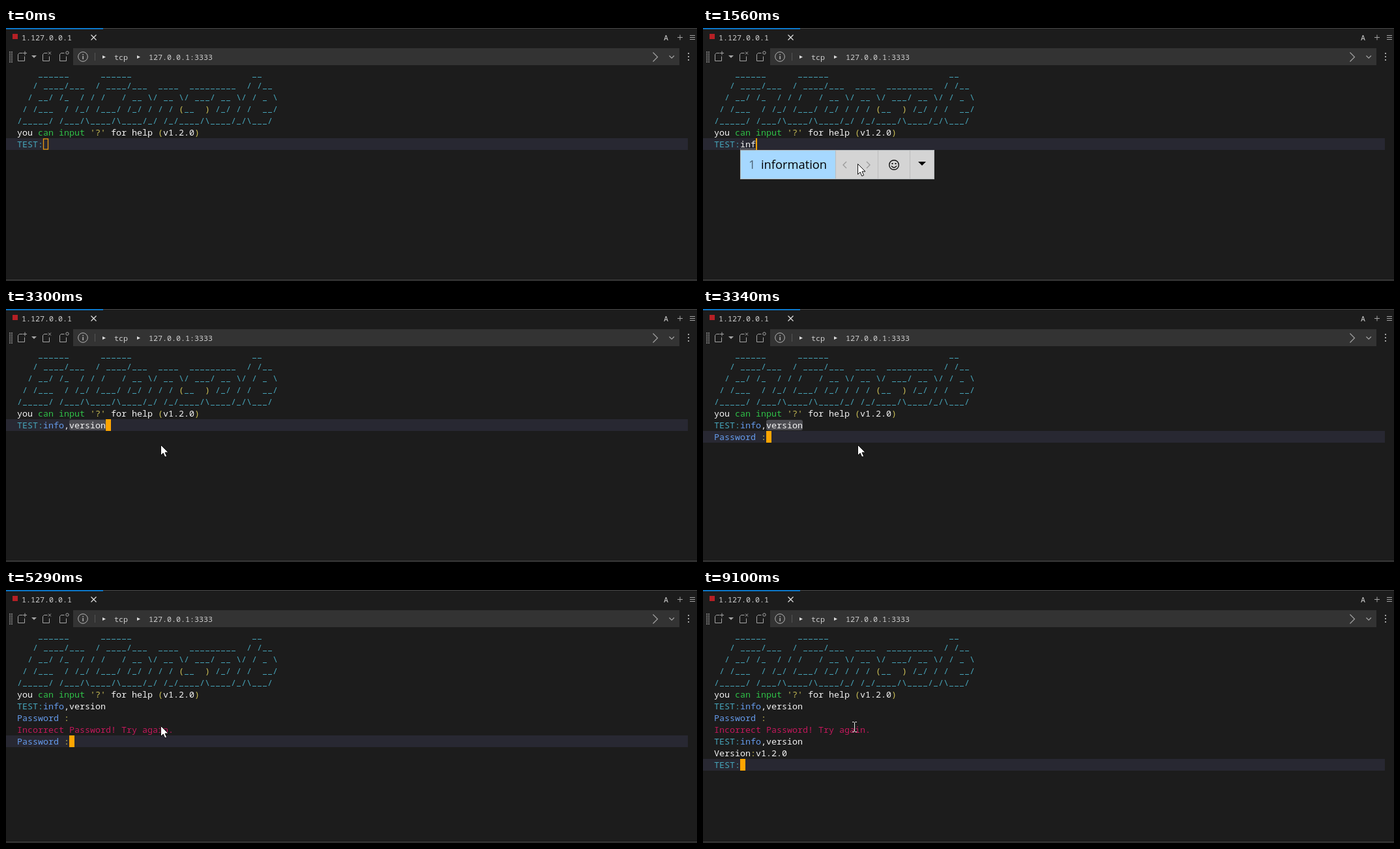
These frames come from a looping animation (1060x388 px, 9.18 s). An HTML page with a canvas:

```html
<!DOCTYPE html>
<html lang="en">
<head>
<meta charset="utf-8">
<title>Terminal session</title>
<style>
html, body { margin: 0; width: 100%; height: 100%; overflow: hidden; background: #1c1c1c; }
canvas { display: block; }
</style>
</head>
<body>
<canvas id="stage" width="1060" height="388"></canvas>
<script>
const ctx = document.getElementById('stage').getContext('2d');
const LOOP = 9180, LEFT = 17, CELL = 8, LINE = 18, TOP = 61;
const MONO = '"Noto Sans Mono", "DejaVu Sans Mono", monospace';
const TEAL = '#46a5ba', WHITE = '#f4f4f4', GREEN = '#2fc048', YELLOW = '#c9bd55';
const BLUE = '#659bec', RED = '#c2185b', ORANGE = '#ffa500', GREY = '#a5a5a5';

const BANNER = [
  '    ______      ______                       __',
  '   / ____/___  / ____/___  ____  _________  / /__',
  '  / __/ /_  / / /   / __ \\/ __ \\/ ___/ __ \\/ / _ \\',
  ' / /___  / /_/ /___/ /_/ / / / (__  ) /_/ / /  __/',
  '/_____/ /___/\\____/\\____/_/ /_/____/\\____/_/\\___/'
];
const HELP = [['you ', WHITE], ['can input ', GREEN], ["'?'", YELLOW], [' for help ', WHITE],
  ['(', YELLOW], ['v1.2.0', WHITE], [')', YELLOW]];
const PROMPT = [['TEST:', TEAL]];
const COMMAND = [...PROMPT, ['info', BLUE], [',version', WHITE]];
const PASSWORD = [['Password ', BLUE], [':', YELLOW]];
const ERROR = [['Incorrect Password! Try again.', RED]];
const VERSION = [['Version', WHITE], [':', YELLOW], ['v1.2.0', WHITE]];

const rowY = row => TOP + row * LINE;
const colX = col => LEFT + col * CELL;

function rect(x, y, w, h, color) {
  ctx.fillStyle = color;
  ctx.fillRect(x, y, w, h);
}

function stroke(path, color, width = 1) {
  ctx.strokeStyle = color;
  ctx.lineWidth = width;
  ctx.stroke(new Path2D(path));
}

function fill(path, color) {
  ctx.fillStyle = color;
  ctx.fill(new Path2D(path));
}

function circle(x, y, r, color, width = 1) {
  ctx.beginPath();
  ctx.arc(x, y, r, 0, 7);
  ctx.strokeStyle = color;
  ctx.lineWidth = width;
  ctx.stroke();
}

function text(str, x, y, color, font) {
  ctx.font = font;
  ctx.fillStyle = color;
  ctx.fillText(str, x, y);
}

// Terminal text sits on a fixed grid; underscores keep a gap between cells.
function print(row, runs) {
  let col = 0;
  for (const [str, color] of runs) {
    for (const ch of str) {
      const x = colX(col++), y = rowY(row) + 14;
      if (ch === '_') rect(x + 1, y, 6, 1, color);
      else text(ch, x, y, color, '13.333px ' + MONO);
    }
  }
}

function gridLabel(str, x, y) {
  [...str].forEach((ch, i) => text(ch, x + i * 7, y, '#cfcfcf', '11.667px ' + MONO));
}

function drawChrome() {
  rect(0, 0, 1060, 388, '#1c1c1c');
  rect(0, 0, 1060, 1, '#484848');
  rect(0, 0, 149, 2, '#0c74c4');
  rect(0, 386, 1060, 1, '#4a4a4a');
  rect(10, 9, 8, 8, '#b52025');
  gridLabel('1.127.0.0.1', 24, 19);
  stroke('M130.5 10.5l8 8m0-8l-8 8', '#e0e0e0', 1.2);
  gridLabel('A', 1009, 19);
  stroke('M1030 14.5h8m-4-4v8', GREY);
  stroke('M1049 11.5h8m-8 3h8m-8 3h8', GREY);

  for (let y = 36; y < 53; y += 3) {
    rect(5, y, 2, 2, '#777');
    rect(8, y, 2, 2, '#777');
  }
  for (const x of [18.5, 56.5, 82.5]) stroke(`M${x + 7} 38.5h-5l-2 2v10h10v-7`, GREY);
  stroke('M26 38.5h6m-3-3v6', GREY);
  stroke('M65 36.5l4 4m0-4l-4 4', GREY);
  circle(94, 38, 2.2, GREY);
  fill('M39 42h8l-4 4z', GREY);

  rect(103, 31, 930, 26, '#333');
  circle(118, 44, 7.3, '#b5b5b5');
  rect(117.5, 40, 1.3, 1.5, '#c5c5c5');
  rect(117.5, 43, 1.3, 5, '#c5c5c5');
  rect(136, 38, 1, 12, '#555');
  fill('M148 42l5 2.5l-5 2.5z', '#ddd');
  fill('M201 42l5 2.5l-5 2.5z', '#ddd');
  gridLabel('tcp', 166, 49);
  gridLabel('127.0.0.1:3333', 219, 49);
  stroke('M992.5 37.5l7 7l-7 7', GREY, 1.2);
  stroke('M1017.5 42.5l3.7 3.7l3.7-3.7', GREY, 1.2);
  for (const y of [38, 43, 48]) rect(1046, y, 2, 2, GREY);
}

function drawCandidates(word, right) {
  const end = right + 152;
  rect(57, 187, end - 57, 45, '#d4d4d4');
  rect(57, 187, right - 57, 45, '#a6d8ff');
  for (const x of [right, right + 65, right + 114]) rect(x, 187, 1, 45, '#bdbdbd');
  ctx.strokeStyle = '#b4b8bb';
  ctx.lineWidth = 1;
  ctx.strokeRect(57.5, 187.5, end - 58, 44);
  const font = '18.3px "Open Sans", "Noto Sans", sans-serif';
  text('1', 70, 216, '#4d6475', font);
  text(word, 89, 216, '#000', font);
  stroke(`M${right + 17} 205l-5 5l5 5M${right + 48} 205l5 5l-5 5`, '#999', 1.3);
  const face = right + 90;
  circle(face, 210, 7.3, '#111', 1.4);
  rect(face - 3.5, 207, 2, 2, '#111');
  rect(face + 1.5, 207, 2, 2, '#111');
  stroke(`M${face - 4} 211.5q4 5 8 0`, '#111', 1.3);
  fill(`M${right + 127} 205h12l-6 6z`, '#000');
}

function drawArrow(x, y) {
  const path = `M${x + .5} ${y + .5}v16l3.7-3.5l2.6 6l2.8-1.2l-2.6-5.8h5z`;
  fill(path, '#fff');
  stroke(path, '#111');
}

function drawBeam(x, y) {
  stroke(`M${x - 3} ${y - 7.5}h2.5l1 1l1-1h2.5M${x + .5} ${y - 7}v14M${x - 3} ${y + 7.5}h2.5l1-1l1 1h2.5`, '#e8e8e8');
}

function drawPointer(t) {
  if (t < 40) return;
  if (t < 1270) {
    const step = Math.min(6, Math.floor((t - 40) / (360 / 7)));
    const rest = (1 - step / 6) ** 2;
    drawBeam(Math.round(237 + 214 * rest), Math.round(208 + 137 * rest));
  } else if (t < 8900) drawArrow(237, 208);
  else if (t < 8940) drawBeam(235, 207);
  else drawBeam(232, t < 9100 ? 206 : 210);
}

function session(t) {
  if (t < 1890) {
    const typed = 'inf'.slice(0, t < 1230 ? 0 : t < 1310 ? 1 : t < 1560 ? 2 : 3);
    return { lines: [[...PROMPT, [typed, WHITE]]], cursor: 5 + typed.length, typed };
  }
  if (t < 2260) return { lines: [[...PROMPT, ['info', WHITE]]], cursor: 9 };
  if (t < 3340) return { lines: [COMMAND], cursor: 17 };
  if (t < 5290) return { lines: [COMMAND, PASSWORD], cursor: 10 };
  if (t < 7200) return { lines: [COMMAND, PASSWORD, ERROR, PASSWORD], cursor: 10 };
  return { lines: [COMMAND, PASSWORD, ERROR, COMMAND, VERSION, PROMPT], cursor: 5 };
}

function drawTerminal(t) {
  const { lines, cursor, typed } = session(t);
  const y = rowY(5 + lines.length), x = colX(cursor);
  rect(0, y, 1046, LINE, '#282832');
  if (t >= 3300 && t < 4340) {
    ctx.beginPath();
    ctx.roundRect(colX(10), rowY(6) + 1, 56, 16, 3);
    ctx.fillStyle = '#4b4b50';
    ctx.fill();
  }
  BANNER.forEach((line, row) =>
    print(row, line.split(/([()])/).map(part => [part, /[()]/.test(part) ? YELLOW : TEAL])));
  print(5, HELP);
  lines.forEach((line, i) => print(6 + i, line));

  if (typed) {
    for (let dot = 57; dot < x; dot += 2) rect(dot, y + 16, 1, 1, '#ddd');
    rect(x, y, 2, LINE, ORANGE);
  } else if (t < 400) {
    ctx.strokeStyle = '#e89a12';
    ctx.lineWidth = 1.3;
    ctx.strokeRect(x + .5, y + 1, 7, 16);
  } else rect(x, y, CELL, LINE, ORANGE);

  if (t >= 3590 && t < 4590) rect(1052, 305, 6, LINE, '#484848');
  if (t >= 1270 && t < 1890) {
    if (t < 1310) drawCandidates('i', 106);
    else if (t < 1560) drawCandidates('in', 117);
    else drawCandidates('information', 203);
  }
}

function frame(now) {
  const t = now % LOOP;
  drawChrome();
  drawTerminal(t);
  drawPointer(t);
  requestAnimationFrame(frame);
}
requestAnimationFrame(frame);
</script>
</body>
</html>
```
